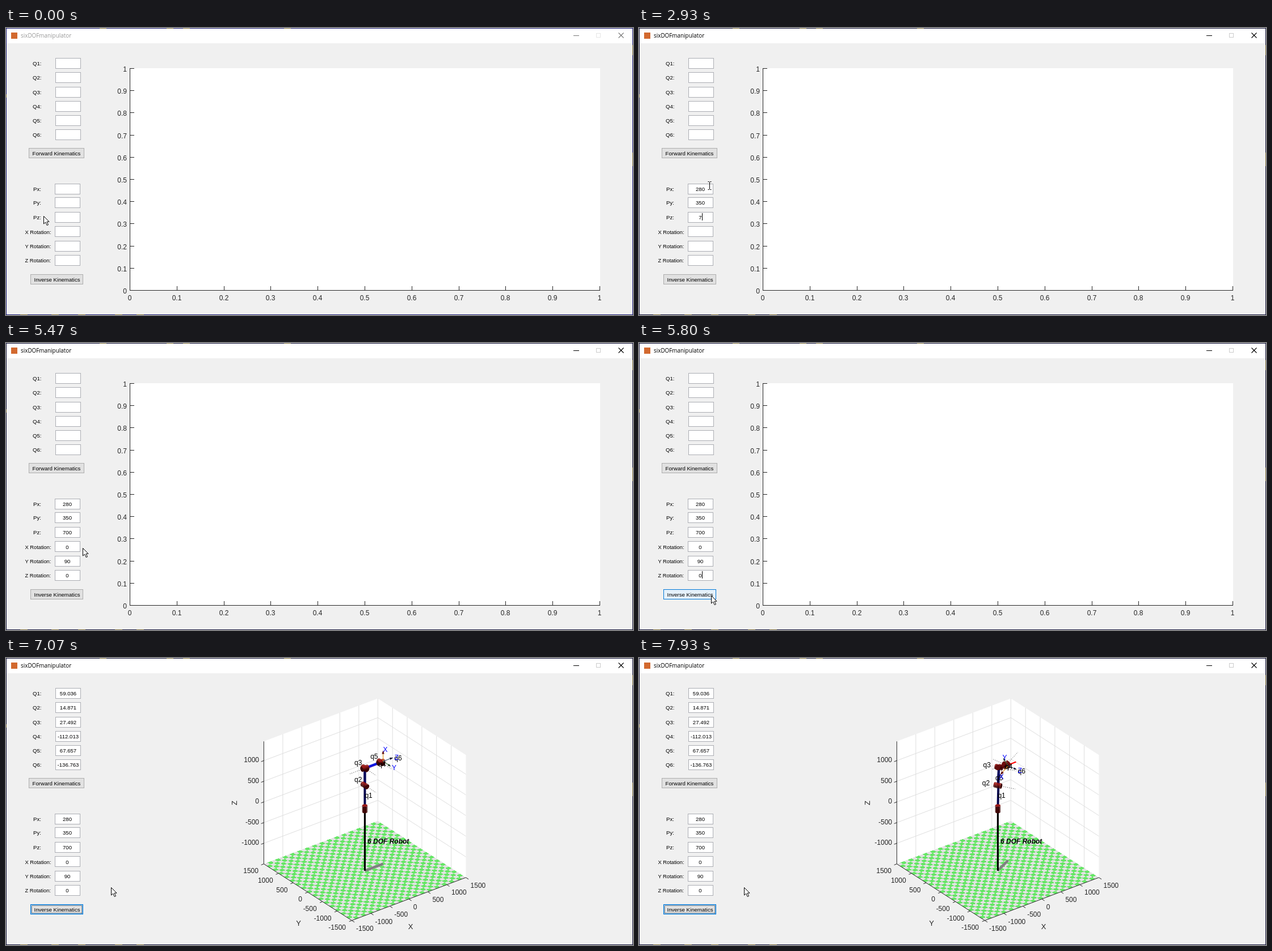
Recreate the animation shown at these times as an HTML page. Size 1105 by 507 pixels, loop 8 s.

```html
<!DOCTYPE html>
<html lang="en">
<head>
<meta charset="utf-8">
<title>sixDOFmanipulator</title>
<style>
  html, body { margin: 0; width: 100%; height: 100%; overflow: hidden; background: #f0f0f0; }
  svg { display: block; }
  text { font-family: "Liberation Sans", Arial, sans-serif; }
  .title { font-family: "Open Sans", "Noto Sans", sans-serif; }
  .crisp { shape-rendering: crispEdges; }
</style>
</head>
<body>
<svg id="stage" width="1105" height="507" viewBox="0 0 1105 507">
  <g id="frame" class="crisp"></g>
  <g id="bar"></g>
  <g id="panel"></g>
  <g id="flat"></g>
  <g id="space"></g>
  <g id="robot"></g>
  <g id="live"></g>
</svg>
<script>
const LOOP = 8000, UI = 9.6, INK = '#262626';
const $ = id => document.getElementById(id);
const range = (n, fn) => Array.from({ length: n }, (_, i) => fn(i)).join('');

// SVG helpers; text is placed by its vertical centre
const text = (x, y, s, size = UI, anchor = 'start', fill = '#000', extra = '') =>
  `<text x="${x}" y="${(y + size * 0.36).toFixed(2)}" font-size="${size}" text-anchor="${anchor}" fill="${fill}" ${extra}>${s}</text>`;
const rect = (x, y, w, h, fill, extra = '') =>
  `<rect x="${x}" y="${y}" width="${w}" height="${h}" fill="${fill}" ${extra}/>`;
const line = (a, b, color, w = 1, extra = '') =>
  `<line x1="${a[0]}" y1="${a[1]}" x2="${b[0]}" y2="${b[1]}" stroke="${color}" stroke-width="${w}" ${extra}/>`;
const poly = (pts, fill, extra = '') =>
  `<polygon points="${pts.map(p => p.map(n => n.toFixed(2)).join()).join(' ')}" fill="${fill}" ${extra}/>`;

// ---------- window and side panel ----------
const Q_TOP = [53, 78, 104, 129, 154, 179];
const P_TOP = [275, 299, 325, 350, 376, 401];
const P_MID = [284, 308, 334, 360, 385, 410];
const P_LABEL = ['Px:', 'Py:', 'Pz:', 'X Rotation:', 'Y Rotation:', 'Z Rotation:'];
const Q_VALUE = ['59.036', '14.871', '27.492', '-112.013', '67.657', '-136.763'];

const box = (x, y) => rect(x + .5, y + .5, 44, 18, '#fff', 'stroke="#abadb3" class="crisp"');
const button = (x, y, w, fill, edge) =>
  rect(x + .5, y + .5, w - 1, 17, fill, `stroke="${edge}" class="crisp"`);

$('panel').innerHTML =
  Q_TOP.map((y, i) => text(47, y + 9.5, `Q${i + 1}:`) + box(87, y)).join('') +
  P_TOP.map((y, i) => text(i < 3 ? 48 : 33.5, P_MID[i] + .8, P_LABEL[i], i < 3 ? UI : 9.3) + box(86, y)).join('') +
  button(40, 212, 98, '#e1e1e1', '#adadad') + text(89, 221.5, 'Forward Kinematics', UI, 'middle');

function drawFrame(edge) {
  const fleck = (x, y, w, h) => rect(x, y, w, h, '#80703c');
  $('frame').innerHTML = rect(0, 0, 1105, 507, edge) + rect(1, 1, 1103, 26, '#fff') + rect(1, 27, 1103, 479, '#f0f0f0') +
    [165, 283, 312, 490].map(x => fleck(x, 0, 12, 1)).join('') +
    [25, 80, 127, 192, 230].map(x => fleck(x, 506, 13, 1)).join('') +
    fleck(1104, 30, 1, 18) + fleck(1104, 220, 1, 24) + fleck(0, 117, 1, 6);
}

function drawBar(active) {
  const ink = active ? '#000' : '#777';
  $('bar').innerHTML = rect(9, 8, 11, 11, '#d2692f') +
    text(26, 13.6, 'sixDOFmanipulator', 9.9, 'start', active ? '#000' : '#999', 'class="title"') +
    line([1000, 13.5], [1010, 13.5], ink) +
    rect(1040.5, 9.5, 7, 7, 'none', `stroke="${active ? '#ccc' : '#e6e6e6'}"`) +
    line([1079.5, 8.5], [1088.5, 17.5], ink, 1.1) + line([1088.5, 8.5], [1079.5, 17.5], ink, 1.1);
}

// ---------- empty 2D axes ----------
const tick = i => (i === 10 ? '1' : i ? '0.' + i : '0');
$('flat').innerHTML = rect(218, 71, 829, 393, '#fff') +
  line([218.5, 71], [218.5, 464], INK) + line([218, 463.5], [1047, 463.5], INK) +
  range(11, i => {
    const x = Math.round(218 + 82.8 * i) + .5, y = Math.round(463 - 39.2 * i) + .5;
    return line([x, 463], [x, 456], INK) + line([218, y], [226, y], INK) +
      text(x - .5, 477, tick(i), 12, 'middle', INK) + text(213, y + 1, tick(i), 12, 'end', INK);
  });

// ---------- 3D axes ----------
const R = 1500, TOP = 1466, TILES = 31;
const project = ([x, y, z]) => [632.4 + .067 * x - .0517 * y, 266.3 - .0253 * x - .0333 * y - .073 * z];
const seg = (a, b, color, w, extra) => line(project(a), project(b), color, w, extra);
const face = (pts, fill, extra) => poly(pts.map(project), fill, extra);

function drawFloor() {
  const at = i => i * 2 * R / TILES - R;
  const cell = (i, j, n, fill) =>
    face([[at(i), at(j), -R], [at(i + n), at(j), -R], [at(i + n), at(j + n), -R], [at(i), at(j + n), -R]], fill, 'class="crisp"');
  return cell(0, 0, TILES, '#e2e2e2') +
    range(TILES, i => range(TILES, j => (i + j) % 2 ? cell(i, j, 1, '#66e666') : ''));
}

function drawSpace() {
  const inner = [-1000, -500, 0, 500, 1000], grid = '#dedede';
  let out = face([[-R, R, -R], [R, R, -R], [R, R, TOP], [-R, R, TOP]], '#fff') +
    face([[R, R, -R], [R, -R, -R], [R, -R, TOP], [R, R, TOP]], '#fff');
  for (const v of inner)
    out += seg([v, R, -R], [v, R, TOP], grid) + seg([R, v, -R], [R, v, TOP], grid) +
      seg([-R, R, v], [R, R, v], grid) + seg([R, R, v], [R, -R, v], grid);
  out += seg([R, R, -R], [R, R, TOP], grid) + drawFloor();
  out += seg([-R, R, -R], [-R, R, TOP], INK) + seg([-R, R, -R], [-R, -R, -R], INK) + seg([-R, -R, -R], [R, -R, -R], INK);
  for (let k = 0; k < 7; k++) {
    const v = k * 500 - R;
    out += seg([v, -R, -R], [v, -R - 90, -R], INK) + seg([-R, v, -R], [-R - 70, v, -R], INK) +
      text(617 + 33.6 * k, 478 - 12.8 * k, v, 12, 'start', INK) +
      text(599 - 25.67 * k, 476 - 16.7 * k, v, 12, 'end', INK);
  }
  inner.forEach((v, k) => {
    out += seg([-R, R, v], [-R - 70, R, v], INK) + text(446, 326 - 36.5 * k, v, 12, 'end', INK);
  });
  return out + text(713, 474, 'X', 13, 'middle', INK) + text(515.5, 468, 'Y', 13, 'middle', INK) +
    text(402, 256, 'Z', 13, 'middle', INK, 'transform="rotate(-90 402 256)"');
}
$('space').innerHTML = drawSpace();

// ---------- robot ----------
const dot = (a, b) => a[0] * b[0] + a[1] * b[1] + a[2] * b[2];
const cross = (a, b) => [a[1] * b[2] - a[2] * b[1], a[2] * b[0] - a[0] * b[2], a[0] * b[1] - a[1] * b[0]];
const along = (p, d, k) => p.map((v, i) => v + d[i] * k);
const unit = a => a.map(v => v / Math.hypot(...a));
function spin(v, axis, deg) {
  const r = deg * Math.PI / 180, c = Math.cos(r), s = Math.sin(r), w = cross(axis, v), d = dot(axis, v) * (1 - c);
  return v.map((n, i) => n * c + w[i] * s + axis[i] * d);
}
const EYE = [-.527, -.687, .5], LIGHT = unit([-.2, -.3, 1]);
const JOINT_END = [59.036, 14.871, 27.492, -112.013, 67.657, -184];

function cylinder(center, axis) {
  const half = 78, radius = 56, n = 16;
  const side = unit(cross(axis, Math.abs(axis[2]) > .9 ? [1, 0, 0] : [0, 0, 1])), up = cross(axis, side);
  const normal = i => side.map((v, k) => v * Math.cos(i * 2 * Math.PI / n) + up[k] * Math.sin(i * 2 * Math.PI / n));
  const at = (i, h) => project(along(along(center, axis, h), normal(i), radius));
  const tint = m => {
    const l = Math.max(0, dot(m, LIGHT)) ** 2;
    return `rgb(${Math.round(56 + 110 * l)},${Math.round(3 + 26 * l)},${Math.round(3 + 22 * l)})`;
  };
  let out = '';
  for (let i = 0; i < n; i++) {
    const m = normal(i + .5);
    if (dot(m, EYE) > -.05) out += poly([at(i, -half), at(i + 1, -half), at(i + 1, half), at(i, half)], tint(m));
  }
  const sign = dot(axis, EYE) > 0 ? 1 : -1;
  return out + poly(Array.from({ length: n }, (_, i) => at(i, half * sign)), tint(axis.map(v => v * sign)));
}

function arrow(from, dir, stem, head) {
  const a = project(along(from, dir, 180)), b = project(along(from, dir, 265));
  const w = [-(b[1] - a[1]) * .35, (b[0] - a[0]) * .35];
  return line(project(from), a, stem, 1.2) + poly([[a[0] + w[0], a[1] + w[1]], [a[0] - w[0], a[1] - w[1]], b], head);
}

function drawRobot(s) {
  const q = JOINT_END.map(v => v * s);
  let f = [1, 0, 0], l = [0, 1, 0], u = [0, 0, 1];
  const turn = (axis, deg) => [f, l, u] = [f, l, u].map(v => spin(v, axis, deg));
  const base = [0, 0, 0], shoulder = [0, 0, 565], foot = [0, 0, -R];

  turn(u, q[0]);
  const hinge = l;
  turn(l, q[1]);
  const elbow = along(shoulder, u, 415);
  turn(l, q[2]);
  const fore = f, wrist = along(elbow, f, 420);
  turn(f, q[3]);
  const pitch = l;
  turn(l, q[4]);
  turn(f, q[5]);
  const tip = along(wrist, f, 60);

  const joints = [[base, [0, 0, 1]], [shoulder, hinge], [elbow, hinge], [elbow, fore], [wrist, pitch], [wrist, f]];
  const floor = p => [p[0], p[1], -R];
  let out = seg(foot, floor(elbow), '#808080', 4.5) + seg(floor(elbow), floor(tip), '#808080', 4.5);
  out += line([634, 195.5], [664.5, 183.5], '#f00', 2.4);
  joints.slice(1).forEach(([p, a]) => out += seg(p, along(p, a, -390), '#222', 1, 'stroke-dasharray="1 2.4"'));
  out += seg(foot, base, '#000', 3.2) + seg(base, elbow, '#07074e', 4) +
    seg(shoulder, elbow, '#07075c', 4) + seg(elbow, wrist, '#1018e0', 4.4);
  joints.forEach(([p, a]) => out += cylinder(p, a));
  out += text(637, 324, '6 DOF Robot', 12, 'start', '#000', 'font-weight="bold" font-style="italic"');

  const back = l.map(v => -v);
  out += arrow(tip, u, '#e0962a', '#5a0a0a') + arrow(tip, back, '#3d6b3d', '#16301a') + arrow(tip, f, '#3d5b7a', '#12122c');
  joints.forEach(([p, a], i) => {
    const [x, y] = project(along(p, a, 355));
    out += text(x, y + 1.8, 'q' + (i + 1), 12);
  });
  [['X', u], ['Y', back], ['Z', f]].forEach(([name, d]) => {
    const [x, y] = project(along(tip, d, 300));
    out += text(x, y + .6, name, 12, 'start', '#00f');
  });
  return out;
}

// ---------- timeline ----------
// time, field, typed text
const KEYS = [
  [330, 0, ''], [1000, 0, '2'], [1270, 0, '28'], [1470, 0, '280'],
  [1670, 1, ''], [1930, 1, '3'], [2200, 1, '35'], [2330, 1, '350'],
  [2470, 2, ''], [2930, 2, '7'], [3200, 2, '70'], [3330, 2, '700'],
  [3470, 3, ''], [3670, 3, '0'],
  [3800, 4, ''], [4130, 4, '9'], [4200, 4, '90'],
  [4400, 5, ''], [4600, 5, '0']
];
const POSES = [7070, 7200, 7400, 7600, 7730, 7930];
const PRESS = 5930, RELEASE = 6070, TICK = 200 / 3;
const clamp = v => Math.min(1, Math.max(0, v));
const smooth = v => v * v * (3 - 2 * v);
const quintic = v => v * v * v * (10 - 15 * v + 6 * v * v);
const stepped = (t, start, n) => smooth(clamp(Math.floor((t - start) / TICK) / n));

function pointer(t) {
  if (t < 70) return { x: 66, y: 332 };
  if (t < 130) return { x: 102, y: 297 };
  if (t < 5267) return { x: 124, y: 278, beam: true };
  if (t < 6128) {
    const p = stepped(t, 5200, 8), x = 124 + 3 * p + 9 * Math.sin(Math.PI * p), y = 278 + 168 * p;
    return { x, y, beam: x < 131 && y < 420 };
  }
  const p = stepped(t, 6061, 7);
  return { x: 127 + 58 * p, y: 446 - 41 * p };
}

function drawPointer({ x, y, beam }) {
  const at = `transform="translate(${Math.round(x) + .5} ${Math.round(y) + .5})"`;
  return beam
    ? `<path ${at} d="M-3-7h2l1 1 1-1h2M0-6V6M-3 7h2l1-1 1 1h2" fill="none" stroke="#000"/>`
    : `<path ${at} d="M0 0V13.5l3.2-3 2.5 5.6 2.3-1-2.5-5.4H9.6Z" fill="#fff" stroke="#000"/>`;
}

function drawInverse(t, cur) {
  const over = !cur.beam && cur.x > 43 && cur.x < 137 && cur.y > 434 && cur.y < 453;
  const focus = t >= RELEASE, press = t >= PRESS && !focus;
  const fill = press ? '#cce4f7' : over ? '#e5f1fb' : '#e1e1e1';
  const edge = press ? '#005499' : over || focus ? '#0078d7' : '#adadad';
  const ring = (inset, extra) =>
    rect(43.5 + inset, 435.5 + inset, 92 - 2 * inset, 17 - 2 * inset, 'none', extra + ' class="crisp"');
  return button(43, 435, 93, fill, edge) +
    (focus ? ring(1, 'stroke="#7ab5e6"') + ring(2, 'stroke="#444" stroke-dasharray="1 1"') : '') +
    text(90, 444.3, 'Inverse Kinematics', UI, 'middle');
}

function drawLive(t) {
  const cur = pointer(t), done = KEYS.filter(k => k[0] <= t), value = [];
  done.forEach(([, i, s]) => value[i] = s);
  let out = drawInverse(t, cur);
  value.forEach((s, i) => out += text(108, P_MID[i] + .5, s, UI, 'middle'));
  if (t >= POSES[0]) Q_VALUE.forEach((s, i) => out += text(109.5, Q_TOP[i] + 9.5, s, UI, 'middle'));
  const last = done[done.length - 1];
  if (last && t < PRESS && (t - last[0]) % 1060 < 530)
    out += rect(Math.round(108 + 2.7 * last[2].length), P_MID[last[1]] - 7, 1, 13, '#000', 'class="crisp"');
  return out + drawPointer(cur);
}

// redraw a layer only when its state changes
const state = {};
function update(key, value, draw) {
  if (state[key] !== value) draw(state[key] = value);
}

function render(t) {
  update('edge', t < 400 ? '#1c1c78' : '#15153c', drawFrame);
  update('active', t >= 330, drawBar);
  const pose = POSES.filter(p => p <= t).length - 1;
  update('pose', pose, k => {
    const solid = k >= 0;
    $('flat').style.display = solid ? 'none' : '';
    $('space').style.display = solid ? '' : 'none';
    $('robot').innerHTML = solid ? drawRobot(quintic(k / 10)) : '';
  });
  update('live', drawLive(t), s => $('live').innerHTML = s);
}

const start = performance.now();
function loop() {
  render((performance.now() - start) % LOOP);
  requestAnimationFrame(loop);
}
loop();
</script>
</body>
</html>
```
